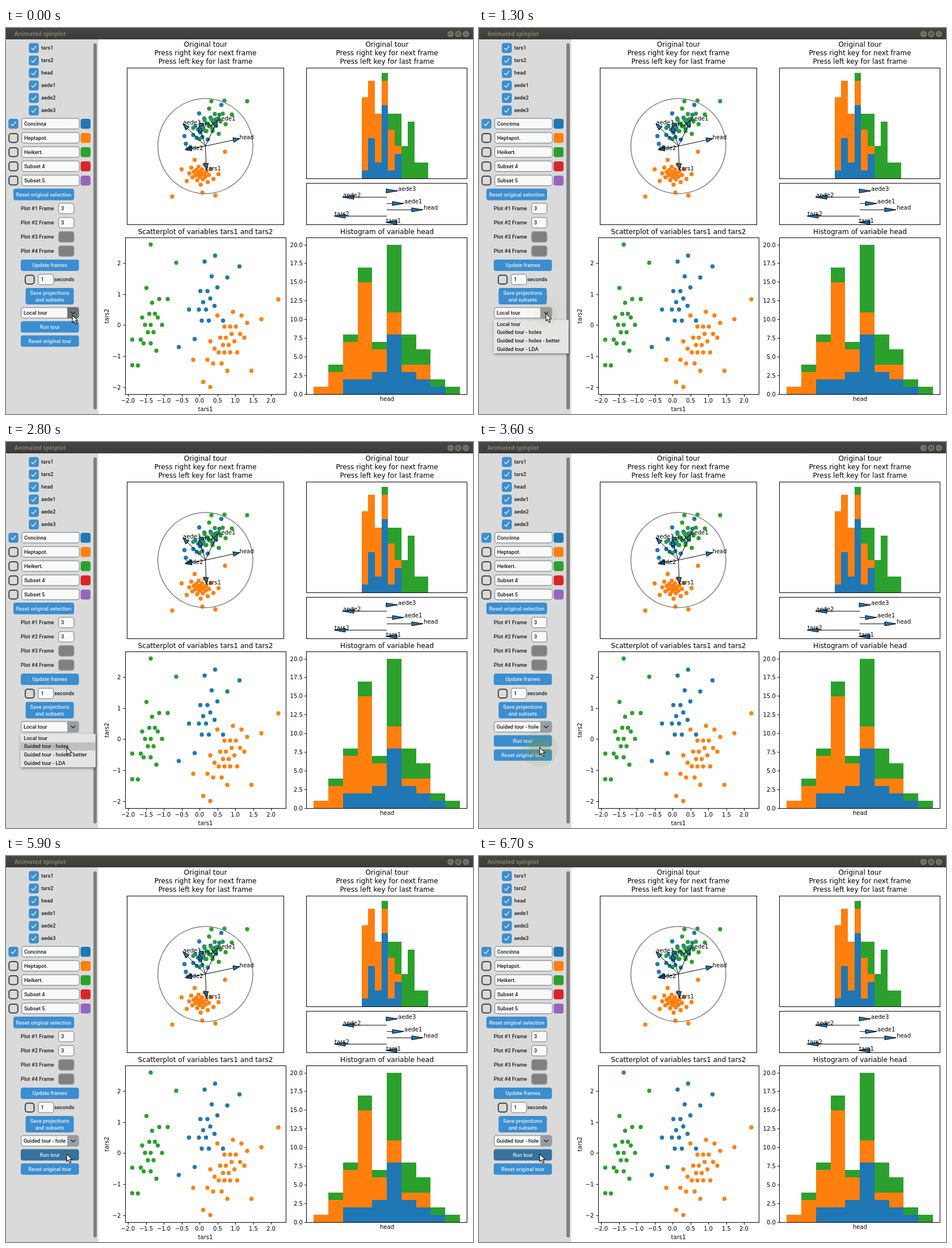
An HTML page with a canvas that plays this animation: 823x680 px, repeating every 8 s.

```html
<!DOCTYPE html>
<html lang="en">
<head>
<meta charset="utf-8">
<title>Projection explorer</title>
<style>
html, body { margin: 0; width: 100%; height: 100%; overflow: hidden; background: #fff; }
canvas { display: block; }
</style>
</head>
<body>
<canvas id="stage" width="823" height="680"></canvas>
<script>
const ctx = document.getElementById('stage').getContext('2d');
const BLUE = '#1f77b4', ORANGE = '#ff7f0e', GREEN = '#2ca02c';
const GROUPS = [BLUE, ORANGE, GREEN];
const ACCENT = '#3b8ed0', HOVER = '#36719f', INK = '#1c1c1c';
const UI = '500 9.3px Roboto, sans-serif';
const PLOT = '10.1px "DejaVu Sans", sans-serif';
const TITLE = '12.1px "DejaVu Sans", sans-serif';
const VARS = ['tars1', 'tars2', 'head', 'aede1', 'aede2', 'aede3'];
const MENU_TOP = 514.2, ROW = 14.7;

// time, pointer x, pointer y
const pointer = [
  [0, 117, 506], [200, 117, 504.5], [300, 118, 503], [1500, 113, 522], [1600, 106, 551], [1800, 105, 543.7],
  [1900, 104.5, 541], [2000, 104.5, 545], [2300, 105, 549.5], [2800, 107, 538], [4400, 107, 525]
];
const clicks = [600, 3200, 5900];

function text(s, x, y, font = UI, color = INK, align = 'left') {
  ctx.font = font;
  ctx.fillStyle = color;
  ctx.textAlign = align;
  ctx.fillText(s, x, y);
}
const label = (s, x, y, align) => text(s, x, y, PLOT, '#000', align);
const heading = (s, x, y) => text(s, x, y, TITLE, '#000', 'center');

function box(x, y, w, h, fill, border, r = 4, width = 1.5) {
  const inset = border ? width / 2 : 0;
  ctx.beginPath();
  ctx.roundRect(x + inset, y + inset, w - 2 * inset, h - 2 * inset, r);
  if (fill) { ctx.fillStyle = fill; ctx.fill(); }
  if (border) { ctx.strokeStyle = border; ctx.lineWidth = width; ctx.stroke(); }
}
function disc(x, y, r, color) {
  ctx.beginPath();
  ctx.arc(x, y, r, 0, 7);
  ctx.fillStyle = color;
  ctx.fill();
}
function line(points, color = '#000', width = 1) {
  ctx.beginPath();
  for (let i = 0; i < points.length; i += 2) ctx.lineTo(points[i], points[i + 1]);
  ctx.strokeStyle = color;
  ctx.lineWidth = width;
  ctx.stroke();
}
function frame(x, y, w, h) {
  ctx.strokeStyle = '#000';
  ctx.lineWidth = 1;
  ctx.strokeRect(x, y, w, h);
}

// Evenly spread bell-shaped cloud around (cx, cy), plus a few far points
const bell = u => Math.log(u / (1 - u)) / 1.7;
function cloud(color, n, cx, cy, sx, sy, slope, far, snapX = .5, snapY = .5) {
  const snap = (v, step) => Math.round(v / step) * step;
  for (let i = 0; i < n; i++) {
    const dx = sx * bell((i + .5) / n);
    const dy = slope * dx + sy * bell((i * .618 + .31) % 1);
    disc(snap(cx + dx, snapX), cy + snap(dy, snapY), 3.7, color);
  }
  for (const [x, y] of far) disc(x, y, 3.7, color);
}
function bars(x, w, base, unit, stacks) {
  stacks.forEach((stack, i) => {
    const left = Math.round(x + i * w), right = Math.round(x + (i + 1) * w);
    let sum = 0;
    stack.forEach((count, g) => {
      const low = Math.round(base - sum * unit);
      sum += count;
      const high = Math.round(base - sum * unit);
      ctx.fillStyle = GROUPS[g];
      ctx.fillRect(left, high, right - left, low - high);
    });
  });
}
function arrow(x, y, tx, ty, head, half) {
  line([x, y, tx, ty]);
  ctx.save();
  ctx.translate(tx, ty);
  ctx.rotate(Math.atan2(ty - y, tx - x));
  ctx.beginPath();
  ctx.moveTo(0, 0);
  ctx.lineTo(-head, -half);
  ctx.lineTo(-head, half);
  ctx.closePath();
  ctx.fillStyle = BLUE;
  ctx.fill();
  ctx.stroke();
  ctx.restore();
}

function projection() {
  cloud(BLUE, 20, 347, 177, 15, 13, -.6, [[317, 204], [376, 153]]);
  cloud(ORANGE, 27, 342, 257, 14, 10, .1, [[293, 297], [369, 295], [346, 290], [386, 218]]);
  cloud(GREEN, 19, 364, 168, 16, 12, -.4, [[362, 129], [385, 128], [425, 129]]);
  ctx.beginPath();
  ctx.arc(351.3, 208, 83.7, 0, 7);
  ctx.strokeStyle = '#808080';
  ctx.lineWidth = 1.5;
  ctx.stroke();
  const tips = [[353, 250], [340, 172], [411.5, 195], [373, 162], [316, 214.5], [312, 169]];
  tips.forEach(([x, y]) => arrow(351.5, 208, x, y, 11, 4));
  tips.forEach(([x, y], i) => label(VARS[i], x, y + .5));
  frame(213.5, 70.5, 276, 276);
}

function projectedHistogram() {
  bars(626.5, 11.7, 265.4, 14.33, [
    [1, 9], [5, 7], [2, 6], [9, 3, 1], [1, 5, 2], [3, 1, 4], [0, 0, 4], [0, 0, 7], [0, 0, 2], [0, 0, 2]
  ]);
  frame(529.5, 70.5, 283, 195);
  const ends = [669, 578, 735, 701, 593, 690], rowY = i => 342.5 - i * 11.1;
  ends.forEach((x, i) => arrow(671, rowY(i), x, rowY(i), 20, 3.5));
  ends.forEach((x, i) => label(VARS[i], x + 1, rowY(i)));
  frame(529.5, 273.5, 283, 73);
}

function scatterplot() {
  cloud(BLUE, 15, 353, 483, 15, 30, -.9, [[411.5, 420], [368.5, 401], [390, 439.5], [304.5, 562]], 2.5, 6.5);
  cloud(ORANGE, 29, 390, 552, 25, 26, -.8, [[480, 478], [360, 632.5]], 2.5, 6.5);
  cloud(GREEN, 19, 254, 523, 15, 30, -1.2, [[255, 381.5], [300, 413.5], [222.5, 594]], 2.5, 6.5);
  frame(210.5, 369.5, 283, 276);
  for (let v = -4; v <= 4; v++) {
    const x = Math.round(341.3 + v * 31.5) + .5;
    line([x, 645.5, x, 649.5]);
    label((v / 2).toFixed(1).replace('-', '−'), x - .5, 660, 'center');
  }
  for (let v = -2; v <= 2; v++) {
    const y = Math.round(523.3 - v * 54.6) + .5;
    line([206.5, y, 210.5, y]);
    label(String(v).replace('-', '−'), 202.5, y + 3.5, 'right');
  }
  label('tars1', 351.5, 674.5, 'center');
  ctx.save();
  ctx.translate(181, 507.5);
  ctx.rotate(-Math.PI / 2);
  label('tars2', 0, 0, 'center');
  ctx.restore();
}

function histogram() {
  bars(542.4, 25.73, 645.5, 13.17, [
    [0, 1], [0, 3, 1], [2, 5, 1], [2, 13, 2], [3, 3, 1], [8, 3, 9], [3, 1, 4], [2, 2, 2], [1, 0, 1], [0, 0, 1]
  ]);
  frame(529.5, 369.5, 283, 276);
  for (let i = 0; i <= 8; i++) {
    const y = Math.round(645 - i * 32.93) + .5;
    line([526, y, 529.5, y]);
    label((i * 2.5).toFixed(1), 523, y + 3.5, 'right');
  }
  label('head', 671.5, 657, 'center');
}

function plots() {
  for (const x of [351.5, 671.5]) {
    ['Original tour', 'Press right key for next frame', 'Press left key for last frame']
      .forEach((s, i) => heading(s, x, 33 + i * 15));
  }
  heading('Scatterplot of variables tars1 and tars2', 351.5, 363);
  heading('Histogram of variable head', 671.5, 363);
  projection();
  projectedHistogram();
  scatterplot();
  histogram();
}

function check(x, y, on) {
  box(x, y - 8.5, 17.5, 17.5, on && ACCENT, on ? null : '#3e454a', 4, 2);
  if (on) line([x + 4.5, y + .5, x + 7.5, y + 3.5, x + 13, y - 3.5], '#eef3f8', 1.4);
}
const entry = (x, y, w, fill = '#f9f9fa') => box(x, y - 10, w, 20, fill, '#979da2');
function button(x, y, w, h, lines, fill = ACCENT) {
  box(x, y - h / 2, w, h, fill);
  lines.forEach((s, i) =>
    text(s, x + w / 2, y + 3.3 + (i - (lines.length - 1) / 2) * 12, UI, '#e4ebf3', 'center'));
}

function sidebar(t) {
  ctx.fillStyle = '#dadada';
  ctx.fillRect(0, 20, 162.5, 660);
  box(154, 27, 6, 645, '#808080', null, 3);

  VARS.forEach((name, i) => {
    check(40.3, 35 + i * 22, true);
    text(name, 62, 38.3 + i * 22);
  });
  const swatches = [...GROUPS, '#d62728', '#9467bd'];
  ['Concinna', 'Heptapot.', 'Heikert.', 'Subset 4', 'Subset 5'].forEach((name, i) => {
    const y = 168.5 + i * 25;
    check(4.3, y, i === 0);
    entry(27, y, 103);
    text(name, 32, y + 3.3);
    box(131.5, y - 8.5, 17.5, 17.5, swatches[i]);
  });
  button(13, 293.3, 107, 20.5, ['Reset original selection']);
  for (let i = 0; i < 4; i++) {
    const y = 318 + i * 25;
    text(`Plot #${i + 1} Frame`, 26, y + 3.3);
    entry(92, y, 28.5, i < 2 ? undefined : '#808080');
    if (i < 2) text('3', 97, y + 3.3);
  }
  button(26, 418, 102.5, 20, ['Update frames']);
  check(33, 443, false);
  entry(56, 443, 28.5);
  text('1', 61.5, 446.3);
  text('seconds', 85, 446.3);
  button(34.5, 472.5, 85, 29, ['Save projections', 'and subsets']);

  // drop-down field
  entry(26, 501.7, 102.5);
  ctx.save();
  ctx.beginPath();
  ctx.rect(26, 490, 79.5, 24);
  ctx.clip();
  text(t < 3300 ? 'Local tour' : 'Guided tour - holes', 31, 505);
  ctx.restore();
  ctx.beginPath();
  ctx.roundRect(108, 491.7, 20.5, 20, [0, 4, 4, 0]);
  ctx.fillStyle = t < 1000 ? '#6e7174' : '#979da2';
  ctx.fill();
  line([114.5, 500, 118.3, 503.7, 122, 500], INK, 1.3);

  button(26, 526.5, 102.5, 20, ['Run tour'], t < 4400 ? ACCENT : HOVER);
  button(26, 551.5, 102.5, 20, ['Reset original tour']);
}

function menu(pointerY) {
  ctx.save();
  ctx.shadowColor = 'rgba(0,0,0,.5)';
  ctx.shadowBlur = 5;
  ctx.shadowOffsetY = 1.5;
  ctx.fillStyle = '#e5e5e5';
  ctx.fillRect(25.5, MENU_TOP, 132.5, 4 * ROW);
  ctx.restore();
  const row = Math.floor((pointerY - MENU_TOP) / ROW);
  if (row >= 0) {
    ctx.fillStyle = '#bfbfbf';
    ctx.fillRect(26, MENU_TOP + row * ROW, 131.5, ROW);
  }
  ['Local tour', 'Guided tour - holes', 'Guided tour - holes - better', 'Guided tour - LDA']
    .forEach((s, i) => text(s, 31.5, 524.6 + i * ROW));
}

function titleBar() {
  const g = ctx.createLinearGradient(0, 0, 0, 20);
  g.addColorStop(0, '#474641');
  g.addColorStop(1, '#3c3b37');
  ctx.fillStyle = g;
  ctx.fillRect(0, 0, 823, 20);
  text('Animated spinplot', 15, 13.8, '600 9.8px "Noto Sans", sans-serif', '#807d76');
  [783.5, 797, 810.5].forEach(x => disc(x, 10.5, 5.6, '#76746d'));
  line([781, 10.5, 786, 10.5], '#3c3b37');
  ctx.strokeRect(795, 8.5, 4, 4);
  line([808.5, 8.5, 812.5, 12.5], '#3c3b37');
  line([812.5, 8.5, 808.5, 12.5], '#3c3b37');
}

function ripple(age, x, y) {
  const p = age / 800, r = 4 + 30 * (1 - (1 - p) ** 4), alpha = .45 * (1 - p);
  disc(x, y + 2, r, `rgba(135,155,45,${alpha * .5})`);
  disc(x, y + 2, r * .6, `rgba(135,150,35,${alpha})`);
}
function cursor(x, y) {
  ctx.beginPath();
  [[0, 0], [0, 13], [3, 10.3], [5.3, 15.6], [7.6, 14.6], [5.4, 9.5], [9.3, 9.2]]
    .forEach(([dx, dy]) => ctx.lineTo(x + dx, y + dy));
  ctx.closePath();
  ctx.fillStyle = '#fff';
  ctx.fill();
  ctx.strokeStyle = '#111';
  ctx.lineWidth = 1.1;
  ctx.stroke();
}

function draw(t) {
  ctx.fillStyle = '#fff';
  ctx.fillRect(0, 0, 823, 680);
  titleBar();
  plots();
  sidebar(t);
  const [, x, y] = pointer.filter(p => p[0] <= t).pop();
  if (t >= 700 && t < 3300) menu(y);
  for (const c of clicks) if (t >= c && t < c + 800) ripple(t - c, x, y);
  cursor(x, y);
}

let last = -1;
const start = performance.now();
function tick() {
  const t = Math.floor((performance.now() - start) % 8000 / 100) * 100;
  if (t !== last) draw(last = t);
  requestAnimationFrame(tick);
}
tick();
</script>
</body>
</html>
```
